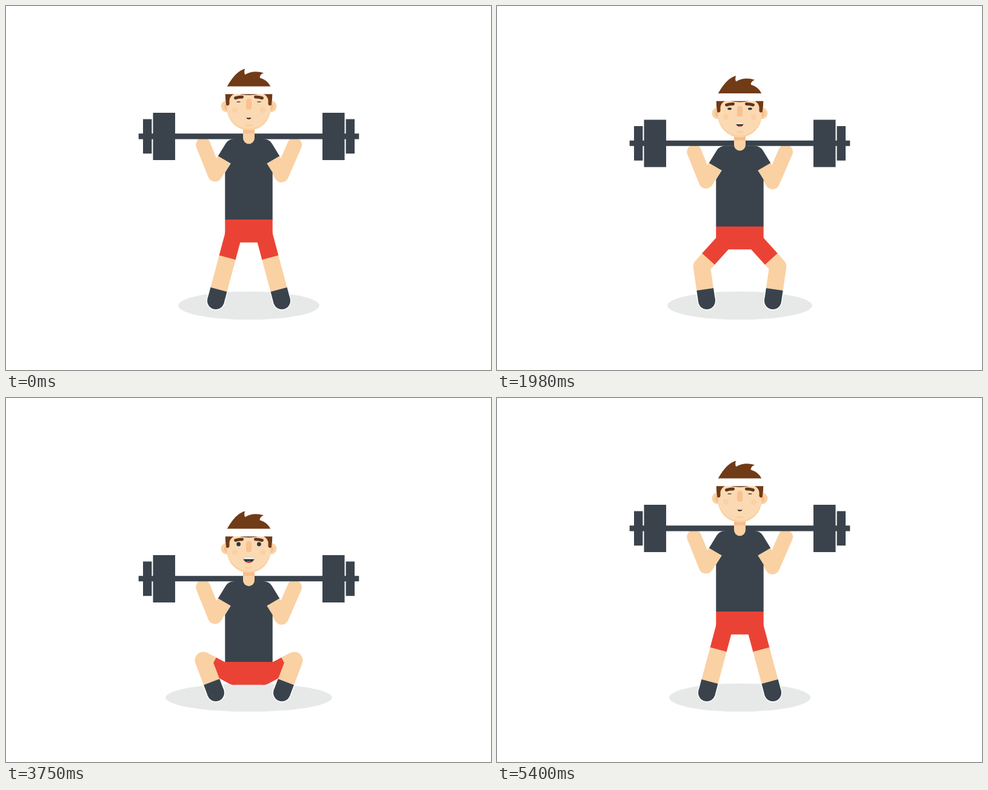
Animation of 800 by 600 pixels, one loop 5430 ms. Source, as an HTML page:

```html
<!DOCTYPE html>
<html>
<head>
<meta charset="utf-8">
<title>Squats</title>
<style>
  html, body { margin: 0; width: 100%; height: 100%; overflow: hidden; background: #fff; }
  svg { display: block; width: 100vw; height: 100vh; }
  .dark { fill: #3a434c; }
  .skin { fill: #fad1a3; }
  .red { fill: #ea4335; }
  .hair { fill: #703b17; }
  .limb { fill: none; stroke: #fad1a3; stroke-linejoin: round; }
</style>
</head>
<body>
<svg viewBox="0 0 800 600">
  <defs>
    <clipPath id="lips"><path d="M-9.5 0H9.5C9.5 6 5 9.5 0 9.5S-9.5 6-9.5 0Z"/></clipPath>
  </defs>

  <ellipse id="shadow" cx="400.5" cy="493.8" ry="23.3" fill="#e7e9e9"/>

  <g id="leg">
    <circle id="hip" class="red" cx="375.5" r="14"/>
    <path id="thigh" fill="none" stroke="#ea4335" stroke-width="28"/>
    <path id="shin" class="limb" stroke-width="28"/>
    <path id="halo" fill="none" stroke="#fff" stroke-width="31"/>
    <circle cx="346" cy="486" r="15.5" fill="#fff"/>
    <path id="sock" fill="none" stroke="#3a434c" stroke-width="28"/>
    <circle class="dark" cx="346" cy="486" r="14"/>
  </g>
  <use href="#leg" transform="matrix(-1 0 0 1 801 0)"/>

  <g id="body">
    <path class="red" d="M361.3 351H439.7V376L426 389.8H375L361.3 376Z"/>
    <path class="limb" stroke-width="24" stroke-linecap="round" d="M325.3 229L344.8 277.5L359 254.5"/>
    <path class="limb" stroke-width="24" stroke-linecap="round" d="M476 229L454.3 278.7L441.5 254.5"/>
    <g id="side">
      <path class="dark" d="M401 219H377Q367 219 362.5 226.5L349.8 247.3L370.7 259.5L361.3 274.5V352H401Z"/>
      <path class="dark" d="M218.7 210.3H401V219.4H218.7ZM226 186.5H240.4V243.3H226ZM242.5 176H279V254H242.5Z"/>
    </g>
    <use href="#side" transform="matrix(-1 0 0 1 801 0)"/>
    <path class="skin" d="M391 195H410V217.7A9.5 9.5 0 0 1 391 217.7Z"/>
    <path d="M391 195H410V210H391Z" fill="#f6bd8d"/>

    <g id="ear">
      <circle class="skin" cx="364" cy="165.5" r="9.4"/>
      <circle cx="366" cy="166" r="6" fill="#f6bd8d"/>
    </g>
    <use href="#ear" transform="matrix(-1 0 0 1 801 0)"/>

    <path class="skin" d="M364.5 145H436.5V169A36 36 0 0 1 364.5 169Z"/>
    <path d="M364.5 145H436.5V165.5A36 36.2 0 0 1 364.5 165.5Z" fill="#fbdab3"/>
    <ellipse cx="400.5" cy="196.5" rx="7" ry="2.3" fill="#fad1a3"/>

    <g id="half">
      <path class="hair" d="M361.7 145H376Q369.5 148.5 368.5 155V161.5A3 3 0 0 1 363.2 163Q361.7 154 361.7 145Z"/>
      <path class="hair" d="M385 145H401V147Q392 147 385 145Z"/>
      <path d="M378.6 151.6Q384 149.8 389.5 150" fill="none" stroke="#63351a" stroke-width="5" stroke-linecap="round"/>
      <circle cx="377.5" cy="171.7" r="4.8" fill="#fbd0a5"/>
      <ellipse class="eye" cx="383.6" cy="158" rx="3.4" fill="#2f3842"/>
    </g>
    <use href="#half" transform="matrix(-1 0 0 1 801 0)"/>
    <rect x="396" y="153" width="9.2" height="18" rx="4" fill="#f8c291"/>

    <g id="mouth" clip-path="url(#lips)">
      <path d="M-10 0H10V10H-10Z" fill="#2f3842"/>
      <path d="M-10 0H10V2.9H-10Z" fill="#fff"/>
      <ellipse cy="9.5" rx="5.5" ry="3.3" fill="#ea4335"/>
    </g>

    <path class="hair" d="M364.5 133Q379 107 394.3 103.5Q392 108.5 394.3 113.2Q408 105 425 110.3Q418.5 113 418.7 118.2Q432 122.5 436.5 133Z"/>
    <path d="M364.8 132.6H436.2Q439 138 439.5 145.2H361.5Q362 138 364.8 132.6Z" fill="#fff"/>
  </g>
</svg>
<script>
  const $ = id => document.getElementById(id);
  const set = (id, name, value) => $(id).setAttribute(name, value);
  const LOOP = 5430, STEP = 30, SQUAT = 2700, DOWN = 900, DEPTH = 85;
  const THIGH = 56.5, SHIN = 57.3, FOOT = [346, 486];

  const smooth = s => s * s * (3 - 2 * s);

  // Cubic bezier easing (0.335, 0, 0.25, 1), solved by bisection
  function ease(x) {
    let lo = 0, hi = 1;
    for (let i = 0; i < 24; i++) {
      const s = (lo + hi) / 2, r = 1 - s;
      if (3 * r * r * s * 0.335 + 3 * r * s * s * 0.25 + s ** 3 < x) lo = s; else hi = s;
    }
    return smooth(lo);
  }

  // Point at a given distance from a towards b
  function along(a, b, dist) {
    const k = dist / Math.hypot(b[0] - a[0], b[1] - a[1]);
    return [a[0] + (b[0] - a[0]) * k, a[1] + (b[1] - a[1]) * k];
  }

  function kneeFor(hip) {
    const dx = FOOT[0] - hip[0], dy = FOOT[1] - hip[1], len = Math.hypot(dx, dy);
    const a = (len * len + THIGH ** 2 - SHIN ** 2) / (2 * len);
    const h = Math.sqrt(Math.max(0, THIGH ** 2 - a * a));
    return [hip[0] + (dx * a - dy * h) / len, hip[1] + (dy * a + dx * h) / len];
  }

  const line = (...points) => "M" + points.map(p => p.join(" ")).join("L");

  function draw(time) {
    const t = Math.floor(time % LOOP / STEP) * STEP % SQUAT;
    const sinking = t < DOWN;
    const x = sinking ? t / DOWN : (t - DOWN) / (SQUAT - DOWN);
    const drop = DEPTH * (sinking ? ease(x) : 1 - ease(x));
    const linear = sinking ? x : 1 - x;
    const effort = (linear + smooth(linear)) / 2;

    const hip = [375.5, 376 + drop], knee = kneeFor(hip);
    const cuff = along(FOOT, knee, 19.2);
    set("hip", "cy", hip[1]);
    set("thigh", "d", line(hip, along(hip, knee, 40.5)));
    set("shin", "d", line(along(hip, knee, 40), knee, along(FOOT, knee, 18.7)));
    set("halo", "d", line(cuff, FOOT));
    set("sock", "d", line(cuff, FOOT));

    set("shadow", "rx", 116.5 + drop / 4);
    set("body", "transform", `translate(0 ${drop})`);
    document.querySelector(".eye").setAttribute("ry", 0.8 + 2.7 * effort);
    set("mouth", "transform", `translate(400.5 ${182.6 - 3.1 * effort}) scale(${0.45 + 0.55 * effort})`);
  }

  const start = performance.now();
  function tick() {
    draw(performance.now() - start);
    requestAnimationFrame(tick);
  }
  tick();
</script>
</body>
</html>
```
